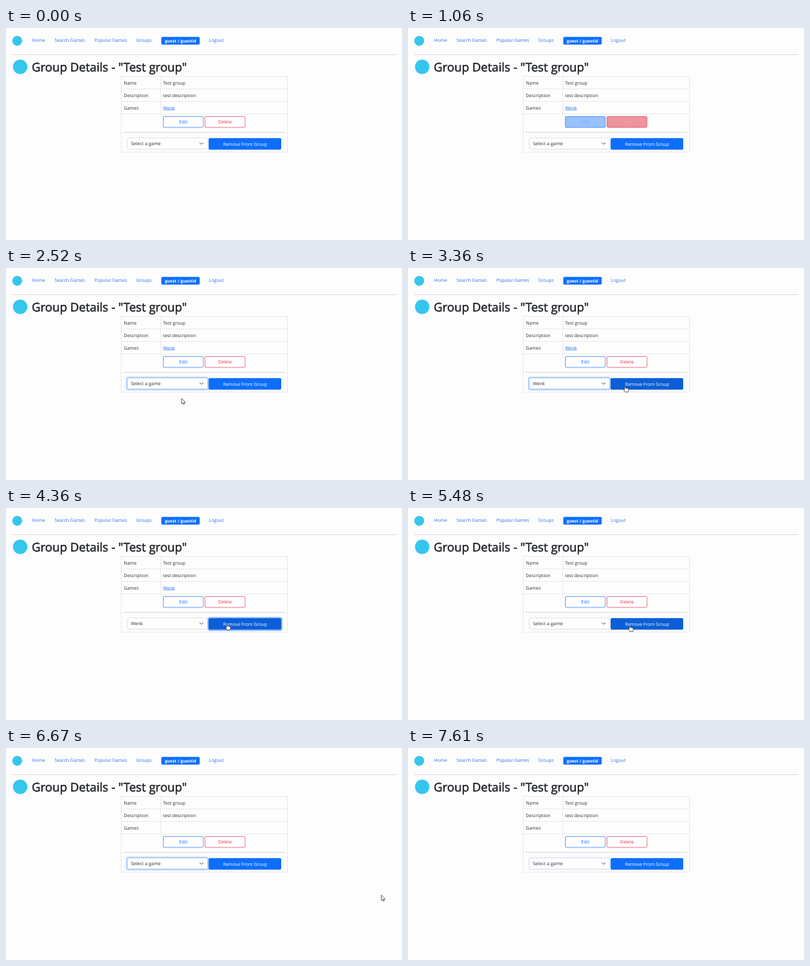
Recreate the animation shown at these times as an HTML page. Size 600 by 322 pixels, loop 7.64 s.

```html
<!DOCTYPE html>
<html lang="en">
<head>
<meta charset="utf-8">
<title>Group details</title>
<style>
html, body { margin: 0; width: 100%; height: 100%; overflow: hidden; background: #fefdfe; }
svg { display: block; width: 600px; height: 322px; }
text { font: 6.92px "Open Sans", "Noto Sans", sans-serif; fill: #2b2f33; text-rendering: geometricPrecision; white-space: pre; }
.link { fill: #2474ea; }
.mid { text-anchor: middle; }
.title { font-size: 18.17px; fill: #1c2024; stroke: #1c2024; stroke-width: .5px; }
.badge { font-size: 6.5px; font-weight: 700; fill: #fff; }
.line { stroke: #e8e8ec; fill: none; shape-rendering: crispEdges; }
.rule { stroke: #d6d6d8; shape-rendering: crispEdges; }
.button { stroke-width: .85px; stroke-opacity: .8; }
</style>
</head>
<body>
<svg viewBox="0 0 600 322">
  <rect width="600" height="322" fill="#fefdfe"/>
  <circle cx="17" cy="19.5" r="7.5" fill="#35c6ee"/>
  <circle cx="21.5" cy="59" r="11" fill="#35c6ee"/>

  <text class="link" x="39.5" y="21">Home</text>
  <text class="link" x="73.6" y="21">Search Games</text>
  <text class="link" x="134" y="21">Popular Games</text>
  <text class="link" x="197.2" y="21">Groups</text>
  <rect x="235.3" y="13.5" width="58.2" height="11.8" rx="2" fill="#0d6efd"/>
  <text class="badge mid" x="264.3" y="22">guest / guestid</text>
  <text class="link" x="307.6" y="21">Logout</text>
  <path class="rule" d="M9 40.5H592"/>
  <text class="title" x="39" y="66">Group Details - "Test group"</text>

  <path class="line" d="M174.5 73.5H426.5V188.5H174.5ZM174.5 92.5H426.5M174.5 111.5H426.5M174.5 130.5H426.5M234.5 73.5V130.5"/>
  <text x="178.5" y="86">Name</text>
  <text x="238" y="86">Test group</text>
  <text x="178.5" y="104.7">Description</text>
  <text x="238" y="104.7">test description</text>
  <text x="178.5" y="123.5">Games</text>
  <g id="game">
    <text class="link" x="238" y="123.5">Wenk</text>
    <path id="under" stroke="#2474ea" stroke-width=".6"/>
  </g>

  <rect id="edit" class="button" x="238.4" y="134.4" width="60.5" height="16.6" rx="1.6" stroke="#0d6efd"/>
  <text id="editText" class="mid" x="268.7" y="145.4">Edit</text>
  <rect id="del" class="button" x="301.6" y="134.4" width="60.5" height="16.6" rx="1.6" stroke="#dc3545"/>
  <text id="delText" class="mid" x="331.8" y="145.4">Delete</text>
  <path class="rule" d="M178 158.5H423"/>

  <rect id="selRing" x="182.6" y="165.8" width="123.6" height="19.2" rx="3" fill="none" stroke="#0d6efd" stroke-opacity=".25" stroke-width="1.8"/>
  <rect id="select" x="183.6" y="166.9" width="121.8" height="17" rx="1.8" fill="#fff" stroke-width=".9"/>
  <text id="choice" x="189.2" y="178.2" style="font-size:7.05px"></text>
  <path d="M293.6 174.2L296.2 176.8L298.8 174.2" fill="none" stroke="#343a40" stroke-width=".9" stroke-linecap="round" stroke-linejoin="round"/>

  <rect id="remRing" x="306.2" y="166.4" width="111.8" height="19.4" rx="2.8" fill="none" stroke="#3184fd" stroke-opacity=".5" stroke-width="1.9"/>
  <rect id="remove" x="307" y="167.3" width="110" height="17.5" rx="1.9"/>
  <text class="mid" x="362.3" y="179" style="fill:#fff">Remove From Group</text>

  <g id="cursor" stroke-linejoin="round">
    <path id="arrow" d="M0 0V8.3L1.9 6.6L3.2 9.4L4.5 8.8L3.2 6.1H5.8Z" fill="#fff" stroke="#222" stroke-width=".7"/>
    <path id="hand" d="M-.8 .6Q0 -.6 .8 .6V3.6Q1.9 2.9 2.6 3.9Q3.6 3.3 4.2 4.3Q5.2 4 5.3 5.2V7L4.4 9.4H.2L-2.3 6.1Q-2.6 4.9 -1.4 5.2L-.8 5.8Z" fill="#fff" stroke="#222" stroke-width=".7"/>
  </g>
</svg>
<script>
const LOOP = 7640, FADE = 150;
const RELOAD = 5300, PICK = 2880, PRESS = 3730;
const SHOW = 1110, HIDE = 6700;
const el = id => document.getElementById(id);

// time, x, y of the pointer tip
const path = [
  [1110, 214, 151], [1300, 226, 168], [1610, 272, 174], [2210, 272, 174],
  [2400, 265, 201], [2520, 266, 198], [2880, 266, 198], [3330, 329, 179],
  [3730, 329, 179], [4300, 335, 176], [4520, 335, 176], [5240, 338, 178],
  [5500, 336, 178], [6060, 296, 174], [6250, 296, 174], [6700, 572, 224]
];

const clamp = v => Math.max(0, Math.min(1, v));
const smooth = v => v * v * (3 - 2 * v);
const easeOut = v => 1 - (1 - v) ** 2;
const ramp = (t, start) => easeOut(clamp((t - start) / FADE));
const pulse = (t, on, off) => ramp(t, on) * (1 - ramp(t, off));
const mix = (a, b, k) => `rgb(${a.map((v, i) => Math.round(v + (b[i] - v) * k))})`;

const BLUE = [13, 110, 253], RED = [220, 53, 69], WHITE = [255, 255, 255];
const GREY = [214, 219, 225], FOCUS = [134, 183, 254], DARK = [11, 94, 215];

function pointer(t) {
  let i = 0;
  while (i < path.length - 2 && t >= path[i + 1][0]) i++;
  const [t0, x0, y0] = path[i], [t1, x1, y1] = path[i + 1];
  const k = smooth(clamp((t - t0) / (t1 - t0)));
  return [x0 + (x1 - x0) * k, y0 + (y1 - y0) * k];
}

function outline(id, colour, k) {
  el(id).setAttribute("fill", mix(WHITE, colour, k));
  el(id + "Text").style.fill = mix(colour, WHITE, k);
}

function draw(t) {
  const listed = t < RELOAD;
  el("game").style.display = listed ? "" : "none";
  el("choice").textContent = t >= PICK && listed ? "Wenk" : "Select a game";

  outline("del", RED, pulse(t, 880, 1020));
  outline("edit", BLUE, pulse(t, 1025, 1175));

  const focus = pulse(t, 1910, PRESS) + pulse(t, 6200, 7510);
  el("selRing").setAttribute("opacity", focus);
  el("select").setAttribute("stroke", mix(GREY, FOCUS, focus));

  el("remRing").setAttribute("opacity", listed ? ramp(t, PRESS) : 0);
  el("remove").setAttribute("fill", mix(BLUE, DARK, pulse(t, 3170, 5900)));

  const [x, y] = pointer(t);
  const over = t > 3100 && t < 6000 && x > 307 && y < 185;
  el("cursor").style.display = t >= SHOW && t < HIDE ? "" : "none";
  el("cursor").setAttribute("transform", `translate(${x.toFixed(2)} ${y.toFixed(2)})`);
  el("arrow").style.display = over ? "none" : "";
  el("hand").style.display = over ? "" : "none";
}

const word = el("game").querySelector("text");
el("under").setAttribute("d", `M238 124.7h${word.getComputedTextLength()}`);

const begin = performance.now();
function tick() {
  draw((performance.now() - begin) % LOOP);
  requestAnimationFrame(tick);
}
tick();
</script>
</body>
</html>
```
